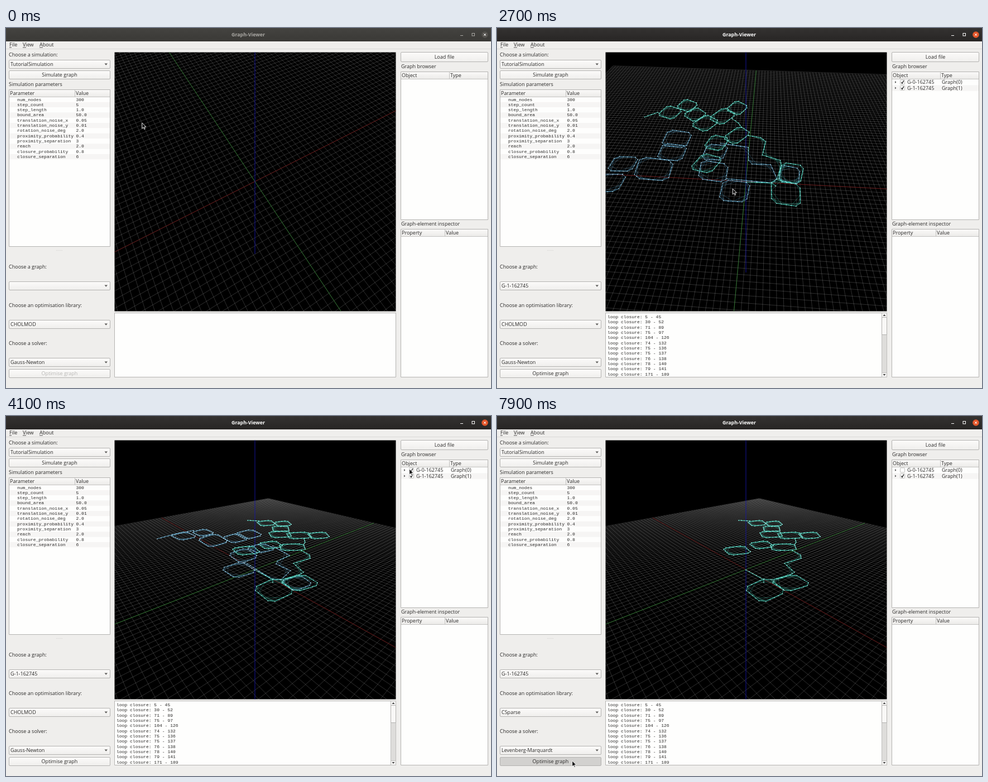
These frames come from a looping animation (869 px wide and 645 px high, 8000 ms). An HTML page with a canvas:

```html
<!DOCTYPE html>
<html lang="en">
<head>
<meta charset="utf-8">
<title>Graph-Viewer</title>
<style>
html, body { margin: 0; width: 100%; height: 100%; overflow: hidden; background: #efeeec; }
canvas { display: block; }
</style>
</head>
<body>
<canvas id="stage" width="869" height="645"></canvas>
<script>
const g = document.getElementById('stage').getContext('2d');
const SANS = '9px "Open Sans", "Noto Sans", sans-serif';
const BOLD = 'bold 8.8px "Open Sans", "Noto Sans", sans-serif';
const MONO = '8.03px "Liberation Mono", "DejaVu Sans Mono", monospace';
const LOOP = 8000, STEP = 100, INK = '#2b2a29';

// ---- motion: each move is [start, end, ...values reached] ----
function track(start, moves, t) {
  let v = start;
  for (const [a, b, ...to] of moves) {
    if (t <= a) break;
    const k = Math.min(1, (t - a) / (b - a)), from = v;
    v = to.map((q, i) => from[i] + (q - from[i]) * k);
  }
  return v;
}
const pointerMoves = [
  [200, 400, 206, 134], [500, 800, 236, 12], [800, 1000, 258, 133], [1100, 1200, 262, 144],
  [1200, 1600, 78, 88], [1700, 1800, 442, 292], [2500, 2900, 401, 282],
  [2900, 3200, 393, 274], [3300, 4100, 722, 94], [4500, 4700, 547, 193], [4800, 4900, 215, 405],
  [5000, 5200, 144, 489], [5300, 5500, 177, 526], [5600, 5700, 140, 526], [5800, 6200, 124, 543],
  [6200, 6600, 134, 597], [6700, 7200, 130, 610], [7300, 7700, 134, 617]
];
// azimuth and elevation in degrees
const orbit = t => track([60, 60.5], [[2500, 2900, 128, 37.6], [2900, 3200, 140, 27.7]], t);
// two wheel clicks zoom out
const distance = t => 50 * 0.887 ** (t < 2100 ? 2 : t < 2200 ? 1 : 0);

// ---- 3D view ----
const VIEW = { x: 194.5, y: 43.5, w: 504, h: 464 };
const CX = 446, CY = 275, FOCAL = 252 / Math.tan(Math.PI / 6), HALF = 50;

function camera(t) {
  const [az, el] = orbit(t).map(d => d * Math.PI / 180);
  return { ca: Math.cos(az), sa: Math.sin(az), ce: Math.cos(el), se: Math.sin(el), d: distance(t) };
}
function toEye(c, [x, y, z = 0]) {
  const b = x * c.ca + y * c.sa;
  return [y * c.ca - x * c.sa, z * c.ce - b * c.se, c.d - b * c.ce - z * c.se];
}
const toScreen = ([x, y, z]) => [CX + FOCAL * x / z, CY - FOCAL * y / z];

// screen point back to the ground plane
function toGround(c, [sx, sy]) {
  const down = sy - CY;
  const b = down * c.d / (FOCAL * c.se + down * c.ce);
  const a = (sx - CX) * (c.d - b * c.ce) / FOCAL;
  return [b * c.ca - a * c.sa, a * c.ca + b * c.sa];
}
function line3(c, p, q) {
  let a = toEye(c, p), b = toEye(c, q);
  const near = 1;
  if (a[2] < near && b[2] < near) return;
  const cut = (u, v) => {
    const k = (near - u[2]) / (v[2] - u[2]);
    return u.map((n, i) => n + (v[i] - n) * k);
  };
  if (a[2] < near) a = cut(a, b);
  else if (b[2] < near) b = cut(b, a);
  g.beginPath();
  g.moveTo(...toScreen(a));
  g.lineTo(...toScreen(b));
  g.stroke();
}

// a walked block: tilted square with cut corners, sized in the final view
function block(x, y, w, h, tilt = 10) {
  const corners = [];
  for (let q = tilt; q < tilt + 360; q += 90) corners.push(q - 11, q + 11);
  const unit = corners.map(d => [Math.cos(d * Math.PI / 180), Math.sin(d * Math.PI / 180)]);
  const m = Math.max(...unit.flat());
  const pts = unit.map(([u, v]) => [x + w * u / m, y + h * v / m]);
  return [...pts, pts[0]];
}
const firstWalk = [
  block(318, 215, 21, 7), block(353, 209, 18, 6), block(371, 223, 25, 11), block(411, 219, 21, 8),
  block(435, 212, 22, 8), block(425, 250, 24, 12), block(417, 276, 28, 13), block(457, 237, 23, 8),
  block(521, 299, 25, 13),
  [[271, 220], [297, 213], [336, 205]],
  [[428, 262], [478, 293], [493, 293]],
  [[478, 233], [508, 250], [486, 260], [484, 265], [510, 277], [493, 293]]
];
const secondWalk = [
  block(480, 312, 33, 20, 8), block(526, 299, 32, 14), block(513, 235, 23, 6, 40),
  block(474, 231, 21, 7, 20), block(430, 241, 24, 8, 25), block(525, 214, 22, 6, 35),
  block(560, 214, 19, 6, 30), block(491, 212, 20, 6, 35), block(492, 202, 15, 5, 40),
  block(466, 192, 16, 5, 25), block(496, 193, 15, 5, 25),
  [[446, 276], [478, 293], [478, 298]],
  [[493, 293], [525, 285], [533, 280], [515, 264], [545, 255], [544, 249], [529, 241]],
  [[533, 231], [536, 226], [534, 220]],
  [[433, 187], [453, 188]]
];
const finalCam = camera(LOOP);

// one node per unit of travel
function nodesOf(path) {
  const pts = path.map(p => toGround(finalCam, p)), out = [pts[0]];
  for (let i = 1; i < pts.length; i++) {
    const [a, b] = [pts[i - 1], pts[i]];
    const n = Math.max(1, Math.round(Math.hypot(b[0] - a[0], b[1] - a[1])));
    for (let k = 1; k <= n; k++) out.push(a.map((v, j) => v + (b[j] - v) * k / n));
  }
  return out;
}
const graphs = [
  { walks: firstWalk.map(nodesOf), edge: '#5596b8', node: '#a5cfe2' },
  { walks: secondWalk.map(nodesOf), edge: '#46cdb8', node: '#93eae0' }
];

function drawGraph(c, { walks, edge, node }) {
  g.strokeStyle = edge;
  for (const w of walks) {
    w.forEach((p, i) => {
      g.globalAlpha = 0.85;
      g.lineWidth = 0.9;
      if (w[i + 1]) line3(c, p, w[i + 1]);
      g.globalAlpha = 0.5;
      g.lineWidth = 0.7;
      if (w[i + 2]) line3(c, p, w[i + 2]);
      if (w[i + 4] && i % 2) line3(c, p, w[i + 4]);
    });
  }
  g.globalAlpha = 1;
  g.fillStyle = node;
  for (const p of walks.flat()) {
    const [x, y] = toScreen(toEye(c, p));
    g.fillRect(x - 0.75, y - 0.75, 1.5, 1.5);
  }
}

function drawView(t) {
  const c = camera(t);
  g.save();
  g.beginPath();
  g.rect(VIEW.x, VIEW.y, VIEW.w, VIEW.h);
  g.fillStyle = '#000';
  g.fill();
  g.clip();
  g.lineWidth = 0.6;
  g.strokeStyle = 'rgba(255,255,255,0.3)';
  for (let i = -HALF; i <= HALF; i++) {
    line3(c, [i, -HALF], [i, HALF]);
    line3(c, [-HALF, i], [HALF, i]);
  }
  g.lineWidth = 0.9;
  ['#6a1414', '#2f7a2f', '#1818a8'].forEach((color, axis) => {
    const end = [0, 0, 0];
    end[axis] = HALF;
    g.strokeStyle = color;
    line3(c, end.map(v => -v), end);
  });
  if (t >= 1800) {
    if (t < 4400) drawGraph(c, graphs[0]);
    drawGraph(c, graphs[1]);
  }
  g.restore();
}

// ---- widgets ----
function text(s, x, cy, { font = SANS, color = INK, align = 'left' } = {}) {
  g.font = font;
  g.fillStyle = color;
  g.textAlign = align;
  g.fillText(s, x, cy + (font === MONO ? 2.5 : 3.1));
}
function rect(color, x, y, w, h) {
  g.fillStyle = color;
  g.fillRect(x, y, w, h);
}
function fade(y, h, top, bottom) {
  const f = g.createLinearGradient(0, y, 0, y + h);
  f.addColorStop(0, top);
  f.addColorStop(1, bottom);
  return f;
}
function box(x, y, w, h, fill, radius = 0, edge = '#b4b3b1') {
  g.beginPath();
  g.roundRect(x + 0.5, y + 0.5, w - 1, h - 1, radius);
  g.fillStyle = fill;
  g.fill();
  g.lineWidth = 1;
  g.strokeStyle = edge;
  g.stroke();
}
function shape(color, ...pts) {
  g.beginPath();
  for (let i = 0; i < pts.length; i += 2) g.lineTo(pts[i], pts[i + 1]);
  g.closePath();
  g.fillStyle = color;
  g.fill();
}
function button(x, y, w, h, label, state) {
  box(x, y, w, h, state === 'down' ? '#d2d1cf' : fade(y, h, '#fcfbfa', '#efeeec'), 1.5);
  text(label, x + w / 2, y + h / 2, { align: 'center', color: state === 'off' ? '#b9b8b6' : INK });
}
function combo(y, label) {
  box(5, y, 182, 16, fade(y, 16, '#fcfbfa', '#efeeec'), 1.5);
  text(label, 8, y + 8);
  shape('#5a5957', 176.5, y + 6.5, 182, y + 6.5, 179.2, y + 9.7);
}
function table(x, y, w, h, split, a, b) {
  box(x, y, w, h, '#fefefd');
  rect(fade(y + 1, 12, '#faf9f8', '#ecebe9'), x + 1, y + 1, w - 2, 12);
  rect('#c4c3c1', x + 1, y + 13, w - 2, 1);
  rect('#c4c3c1', split, y + 1, 1, 12);
  text(a, x + 2, y + 7);
  text(b, split + 2, y + 7);
}
function tick(x, y) {
  g.beginPath();
  g.moveTo(x - 2.2, y);
  g.lineTo(x - 0.6, y + 2.3);
  g.lineTo(x + 2.4, y - 2.8);
  g.lineWidth = 1.3;
  g.strokeStyle = '#222';
  g.stroke();
}
function popup(y, h, items, py) {
  box(5, y, 182, h, '#f8f7f6', 0, '#a9a8a6');
  const row = (h - 2) / items.length;
  const over = Math.min(items.length - 1, Math.max(0, Math.floor((py - y - 1) / row)));
  items.forEach((s, i) => {
    const top = y + 1 + i * row;
    if (i === over) rect('#e9622f', 6, top, 180, row);
    text(s, 22, top + row / 2, { color: i === over ? '#fff' : INK });
    if (!i) tick(13, top + row / 2);
  });
}

const params = `num_nodes 300
step_count 5
step_length 1.0
bound_area 50.0
translation_noise_x 0.05
translation_noise_y 0.01
rotation_noise_deg 2.0
proximity_probability 0.4
proximity_separation 3
reach 2.0
closure_probability 0.8
closure_separation 6`.split('\n').map(s => s.split(' '));

const closures = `loop closure: 5 - 45
loop closure: 30 - 52
loop closure: 71 - 89
loop closure: 75 - 97
loop closure: 104 - 126
loop closure: 74 - 132
loop closure: 75 - 136
loop closure: 75 - 137
loop closure: 76 - 138
loop closure: 78 - 140
loop closure: 79 - 141
loop closure: 171 - 189`.split('\n');

function drawFrame(active) {
  rect('#efeeec', 0, 0, 869, 645);
  rect(active ? fade(0, 24, '#343231', '#272524') : fade(0, 24, '#444340', '#3a3936'), 0, 0, 869, 24);
  const fg = active ? '#fff' : '#aaa8a4';
  text('Graph-Viewer', 434, 12, { font: BOLD, color: fg, align: 'center' });
  rect(fg, 814, 13, 5, 1);
  g.lineWidth = 1;
  g.strokeStyle = fg;
  g.strokeRect(835, 9.5, 4.5, 4.5);
  g.beginPath();
  g.arc(858, 12, 5.8, 0, 7);
  g.fillStyle = active ? '#e3562a' : '#55534f';
  g.fill();
  g.beginPath();
  for (const s of [-2, 2]) {
    g.moveTo(858 - s, 10);
    g.lineTo(858 + s, 14);
  }
  g.strokeStyle = '#fff';
  g.stroke();
  [['File', 6, 4], ['View', 30, 6], ['About', 60, 6]].forEach(([s, x, w]) => {
    text(s, x, 30);
    g.fillRect(x, 34.5, w, 0.8);
  });
  rect('#dad9d7', 0, 37, 869, 1);
}

function drawLeft(t) {
  text('Choose a simulation:', 5, 48);
  combo(57, 'TutorialSimulation');
  button(5, 76, 182, 16, 'Simulate graph');
  text('Simulation parameters', 5, 101);
  table(5, 110, 182, 282, 123, 'Parameter', 'Value');
  params.forEach(([name, value], i) => {
    const y = 128 + i * 9.33;
    if (i % 2) rect('#f6f5f4', 6, y - 4.6, 180, 9.33);
    text(name, 20, y, { font: MONO });
    text(value, 125.5, y, { font: MONO });
  });
  for (let x = 90; x < 102; x += 2) rect('#d5d4d2', x, 398, 1, 1);
  text('Choose a graph:', 5, 428);
  combo(454, t < 1600 ? '' : 'G-1-162745');
  text('Choose an optimisation library:', 5, 497);
  combo(523, t < 6200 ? 'CHOLMOD' : 'CSparse');
  text('Choose a solver:', 5, 565);
  combo(591, t < 7400 ? 'Gauss-Newton' : 'Levenberg-Marquardt');
  button(5, 611, 182, 16, 'Optimise graph', t < 1600 ? 'off' : t >= 7900 ? 'down' : '');
}

function drawConsole(t) {
  box(194, 510, 505, 116, '#fefefd');
  if (t < 1600) return;
  closures.forEach((s, i) => text(s, 198, 517.6 + i * 9.33, { font: MONO }));
  box(689, 510, 10, 116, '#dedddb', 0, '#c0bfbd');
  box(689, 510, 10, 9, '#f6f5f4', 0, '#c0bfbd');
  box(689, 617, 10, 9, '#f6f5f4', 0, '#c0bfbd');
  box(689, 518, 10, 32, '#f8f7f6');
  shape('#444', 691.5, 516, 696.5, 516, 694, 513);
  shape('#444', 691.5, 620, 696.5, 620, 694, 623);
}

function drawRight(t) {
  button(707, 43, 157, 18, 'Load file');
  text('Graph browser', 708, 69);
  table(707, 78, 157, 266, 794, 'Object', 'Type');
  if (t >= 1800) [0, 1].forEach(i => {
    const y = 97 + i * 10.4;
    if (i) rect('#f6f5f4', 708, y - 5, 155, 10.4);
    shape('#555', 713, y - 2, 715.5, y, 713, y + 2);
    box(722, y - 4.5, 9, 9, '#fff', 1, '#c2c1bf');
    if (i || t < 4400) tick(726.5, y);
    text(`G-${i}-162745`, 735, y);
    text(`Graph(${i})`, 797, y);
  });
  text('Graph-element inspector', 708, 351);
  table(707, 360, 157, 266, 786, 'Property', 'Value');
}

function drawPointer(x, y) {
  g.save();
  g.translate(x + 0.7, y + 0.9);
  g.lineJoin = 'round';
  shape('#111', 0, 0, 0, 10.2, 2.4, 8, 4, 11.6, 5.6, 10.9, 4, 7.4, 7.2, 7.2);
  g.lineWidth = 0.9;
  g.strokeStyle = '#fff';
  g.stroke();
  g.restore();
}

function draw(now) {
  const t = Math.floor(now % LOOP / STEP) * STEP;
  const [px, py] = track([243, 169], pointerMoves, t);
  drawFrame(t >= 800);
  drawLeft(t);
  drawView(t);
  drawConsole(t);
  drawRight(t);
  if (t >= 5500 && t < 6200) popup(522, 94, ['CHOLMOD', 'CSparse', 'Dense', 'Eigen', 'PCG', 'Structure only'], py);
  if (t >= 6800 && t < 7400) popup(591, 49, ['Gauss-Newton', 'Levenberg-Marquardt', 'Dogleg'], py);
  drawPointer(px, py);
}

const begin = performance.now();
(function loop() {
  draw(performance.now() - begin);
  requestAnimationFrame(loop);
})();
</script>
</body>
</html>
```
